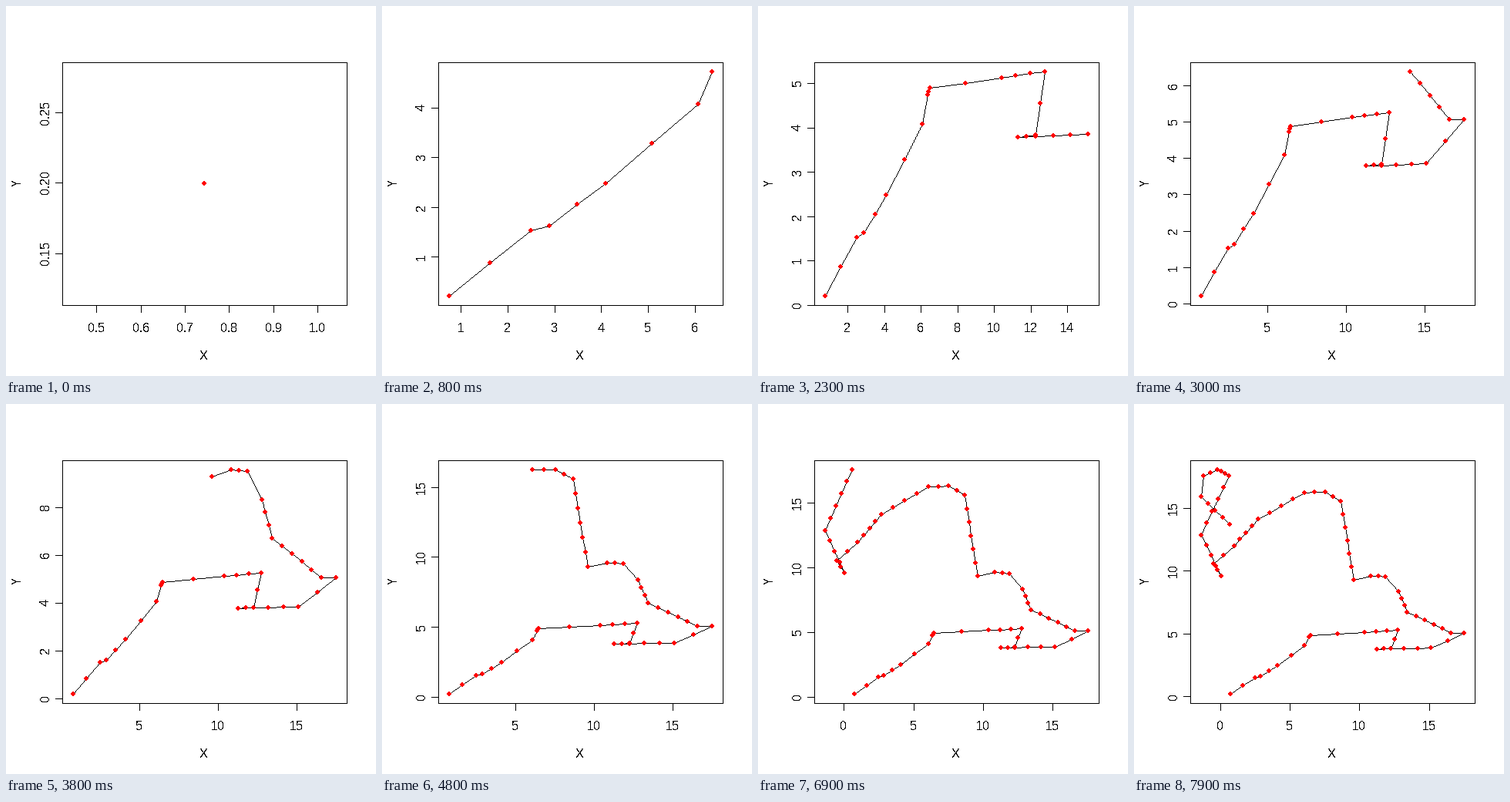
Recreate the animation shown at these times as a matplotlib script. Size 480x480 px, loop 8000 ms.

```python
import math

import matplotlib.pyplot as plt
import numpy as np
from matplotlib.animation import FuncAnimation

SIZE, DPI = 480, 100
STEPS, STEP_MS = 80, 100
LEFT, RIGHT, TOP, BOTTOM = 73.4, 442.4, 73.4, 388.4
BLACK, RED, WHITE = (0, 0, 0), (255, 0, 0), 255

plt.rcParams.update({
    "font.family": "Liberation Sans",
    "font.size": 16 * 72 / DPI,
    "text.antialiased": False,
    "text.hinting": "native",
    "text.hinting_factor": 1,
})

# Turning points of the walk as (step, x, y); it moves evenly between them
TURNS = [
    (0, 0.7445, 0.1994), (2, 2.49, 1.53), (3, 2.885, 1.625), (5, 4.09, 2.48),
    (7, 6.07, 4.085), (8, 6.37, 4.74), (10, 6.48, 4.89), (12, 10.39, 5.13),
    (15, 12.77, 5.27), (17, 12.25, 3.83), (19, 11.28, 3.79), (23, 15.13, 3.86),
    (25, 17.53, 5.08), (26, 16.6, 5.08), (31, 13.44, 6.73), (34, 12.8, 8.34),
    (35, 11.87, 9.53), (37, 10.83, 9.6), (38, 9.6, 9.3), (44, 8.66, 15.56),
    (46, 7.53, 16.27), (48, 6.05, 16.22), (52, 2.7, 14.11), (56, 0.99, 11.97),
    (58, -0.5, 10.54), (60, 0.05, 9.58), (64, -1.37, 12.86), (69, 0.61, 17.57),
    (72, -0.2, 18.07), (74, -1.2, 17.53), (75, -1.4, 15.88), (79, 0.68, 13.67),
]
turn_step, turn_x, turn_y = zip(*TURNS)
X = np.interp(np.arange(STEPS), turn_step, turn_x)
Y = np.interp(np.arange(STEPS), turn_step, turn_y)

# Pixel offsets of the diamond-shaped dot
DOT_Y, DOT_X = np.mgrid[-3:3, -3:3]
inside = abs(DOT_X + 0.5) + abs(DOT_Y + 0.5) <= 3
DOT_X, DOT_Y = DOT_X[inside], DOT_Y[inside]

fig = plt.figure(figsize=(SIZE / DPI, SIZE / DPI), dpi=DPI, facecolor="white")
ax = fig.add_axes([0, 0, 1, 1])
ax.axis("off")
canvas = np.full((SIZE, SIZE, 3), WHITE, np.uint8)
image = ax.imshow(canvas, extent=(0, SIZE, SIZE, 0), interpolation="nearest")


def limits(v):
    """Data range padded by 4 % on each side."""
    lo, hi = v.min(), v.max()
    if lo == hi:
        lo, hi = lo * 0.6, hi * 1.4
    pad = 0.04 * (hi - lo)
    return lo - pad, hi + pad


def ticks(lo, hi):
    """Round tick values and their labels, about five per axis."""
    cell = (hi - lo) / 5
    base = 10 ** math.floor(math.log10(cell))
    unit = base
    for factor, bias in ((2, 0.8), (5, 1.7), (10, 0.8)):
        if factor * base - cell < bias * (cell - unit):
            unit = factor * base
    digits = max(0, -math.floor(math.log10(unit) + 1e-9))
    first = math.ceil(lo / unit - 1e-7)
    last = math.floor(hi / unit + 1e-7)
    return [(k * unit, f"{k * unit:.{digits}f}") for k in range(first, last + 1)]


def scale(lo, hi, start, end):
    return lambda v: start + (v - lo) / (hi - lo) * (end - start)


def line(xs, ys):
    """One-pixel polyline without smoothing."""
    points = np.floor(np.column_stack([xs, ys])).astype(int)
    for a, b in zip(points, points[1:]):
        count = abs(b - a).max() + 1
        px, py = np.rint(np.linspace(a, b, count)).astype(int).T
        canvas[py, px] = BLACK


def label(x, y, text, rotation=0):
    ax.text(x, y, text, rotation=rotation, rotation_mode="anchor",
            ha="center", va="baseline", color="black")


def draw(frame):
    canvas[:] = WHITE
    for text in list(ax.texts):
        text.remove()

    x, y = X[:frame + 1], Y[:frame + 1]
    xlim, ylim = limits(x), limits(y)
    to_x = scale(*xlim, LEFT, RIGHT)
    to_y = scale(*ylim, BOTTOM, TOP)

    line([LEFT, RIGHT, RIGHT, LEFT, LEFT], [TOP, TOP, BOTTOM, BOTTOM, TOP])
    for value, text in ticks(*xlim):
        px = to_x(value)
        line([px, px], [BOTTOM, BOTTOM + 9])
        label(math.floor(px), 423, text)
    for value, text in ticks(*ylim):
        py = to_y(value)
        line([LEFT, LEFT - 9], [py, py])
        label(56, math.floor(py), text, 90)
    label(256, 459, "X")
    label(20, 230, "Y", 90)

    px, py = to_x(x), to_y(y)
    line(px, py)
    for cx, cy in zip(px.astype(int), py.astype(int)):
        canvas[cy + DOT_Y, cx + DOT_X] = RED
    image.set_data(canvas)
    return []


anim = FuncAnimation(fig, draw, frames=STEPS, interval=STEP_MS,
                     init_func=lambda: [], repeat=True, repeat_delay=0)
plt.show()
```
